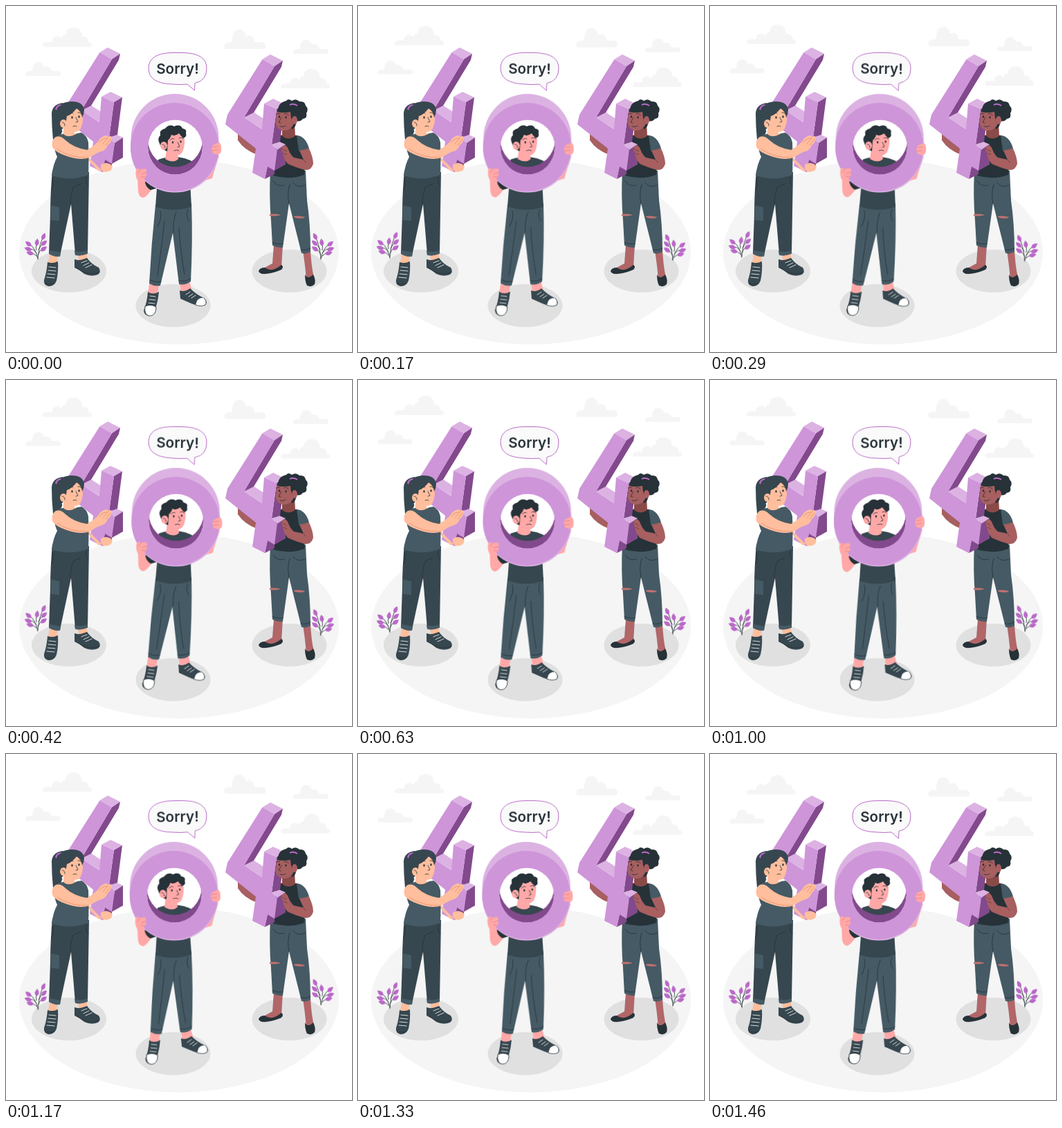
Recreate the animation shown at these times as an HTML page. Size 500x500 px, loop 1500 ms.

```html
<!DOCTYPE html>
<html lang="en">
<head>
<meta charset="utf-8">
<title>Sorry</title>
<style>
html, body { margin: 0; width: 100%; height: 100%; overflow: hidden; background: #fff; }
svg { display: block; width: 100vw; height: 100vh; }
.sway { animation: sway 1.5s linear infinite; }
.float { animation: float 1.5s linear infinite; }
#plants { transform-origin: 250.5px 349px; }
#bubble { transform-origin: 248px 95px; }
#boy { transform-origin: 245px 288px; }
@keyframes sway { 25% { transform: rotate(1deg); } 75% { transform: rotate(-1deg); } }
@keyframes float { 50% { transform: translateY(-10px); } }
.ink { fill: #263238; } .slate { fill: #37474f; } .steel { fill: #455a64; }
.face { fill: #ce95d9; } .lit { fill: #dcb2e3; } .dark { fill: #82498c; } .purple { fill: #ba68c8; }
.pink { fill: #ffa8a7; } .peach { fill: #ffbe9d; } .brown { fill: #a75f60; } .deep { fill: #8a4a48; } .rose { fill: #b16668; }
.line { fill: none; stroke: #263238; stroke-width: .8; stroke-linecap: round; stroke-linejoin: round; }
.lace { fill: none; stroke: #fff; stroke-width: .8; stroke-linecap: round; }
.cloud { fill: #f5f5f5; }
text { font: 600 20.6px Inter, Roboto, sans-serif; fill: #263238; }
</style>
</head>
<body>
<svg viewBox="0 0 500 500">
<defs>
  <path id="big" d="M2 0Q-1-2 1-5Q2-7 8-7H14Q13-15 21-15Q25-15 27-12Q29-18 33-17Q34-28 44-28Q56-28 57-15Q67-15 66-7Q71-7 71-3Q71 0 68 0Z"/>
  <path id="small" d="M2 0Q-1-2 1-5Q2-7 8-7H10Q10-20 19-20Q25-20 27-13Q35-16 38-7H46Q51-7 51-3Q51 0 48 0Z"/>
  <path id="leaf" class="purple" d="M0 0Q-6-4 0-11Q6-4 0 0Z"/>
  <g id="plant">
    <path class="line" d="M46 366Q47 349 53 335M46 360Q48 354 52 351M47 352Q49 348 53 344M46 365Q42 349 35 345M44 357Q40 351 35 351M45 362Q41 358 36 357M44 353Q43 348 44 344"/>
    <use href="#leaf" transform="translate(52 338) rotate(25)"/>
    <use href="#leaf" transform="translate(51 346) rotate(48)"/>
    <use href="#leaf" transform="translate(50 354) rotate(55)"/>
    <use href="#leaf" transform="translate(44 347) rotate(8)"/>
    <use href="#leaf" transform="translate(36.5 347) rotate(-50)"/>
    <use href="#leaf" transform="translate(37 353) rotate(-70)"/>
    <use href="#leaf" transform="translate(40 358.5) rotate(-75)"/>
  </g>
  <g id="four">
    <path class="lit" d="M370.500 77L382 70L400 79L388 87ZM344 161L357 153L374 164L372 179ZM373 141L386 134L403 142L391 149ZM384 200L395 196L404 200L392 208Z"/>
    <path class="dark" d="M388 87L400 79L398 88L358 154L344 161ZM391 149L403 142L396 196L384 200ZM392 208L404 200V229L388 238V243L374 250L378 231H388Z"/>
    <path class="face" d="M370.500 77L388 87L344 161L370 178L373 141L391 149L384 200L392 208L388 238L378 232L374 250L356 241L361 206L317 171L320 157Z"/>
  </g>
</defs>

<ellipse cx="250" cy="355.5" rx="231" ry="133.5" fill="#f5f5f5"/>
<g fill="#e0e0e0">
  <ellipse cx="91" cy="383" rx="54" ry="31"/>
  <ellipse cx="241.500" cy="433" rx="54" ry="31"/>
  <ellipse cx="409.500" cy="383" rx="54" ry="31"/>
</g>

<g class="cloud float">
  <use href="#big" x="53" y="59"/>
  <use href="#big" x="397" y="119"/>
  <use href="#small" x="28" y="101"/>
  <use href="#small" x="415" y="69"/>
  <use href="#small" transform="translate(315 62) scale(1.18 1.4)"/>
</g>

<g id="plants" class="sway">
  <use href="#plant"/>
  <use href="#plant" transform="translate(501) scale(-1 1)"/>
</g>

<g id="bubble" class="sway">
  <path d="M241 67.500H255Q290 68 290 90Q290 108 273 111.500L272.500 122L262 113Q251 114 241 113Q206 112 206 90Q206 68 241 67.500Z" fill="#fafafa" stroke="#ba68c8"/>
  <text x="248" y="97.500" text-anchor="middle">Sorry!</text>
</g>

<!-- left woman -->
<g>
  <path class="slate" d="M82 140Q67 142 66 155Q66 174 68 193Q80 192 82 177Z"/>
  <use href="#four" x="-235" y="-10"/>
  <path class="peach" d="M137 229L143 227Q151 227 154 232L152 237Q147 241 140 239Q136 235 137 229ZM118 217L138 237L134 239L118 222Z"/>
  <path class="peach" d="M63 358H75L74 372Q67 377 61 371ZM103 354H116L118 367L106 372Z"/>
  <path class="slate" d="M60 370Q67 373 75 369Q76 383 73 397Q69 406 61 405Q54 403 55 396Q59 384 60 370ZM99 366Q106 369 117 364Q123 373 134 378Q138 384 133 388Q123 392 113 387Q106 381 99 378Z"/>
  <path class="lace" d="M62 377L72 378M61 382L72 383M60 387L71 388M59 392L70 393M109 371L117 368M112 375L120 371M115 378L124 374"/>
  <path class="line" d="M56 400Q63 405 71 400M101 378Q118 391 134 385"/>
  <path class="slate" d="M67 238Q64 269 64 302L62 358Q70 363 78 361L94 286L100 359Q109 362 118 357L120 240Z"/>
  <path class="steel" d="M62 353L79 356L78 362Q69 363 62 358ZM99 354Q109 357 118 353V358Q108 362 100 360ZM65 288L77 291V311L65 309Z"/>
  <path class="line" d="M93 287Q93 270 98 261L108 257M67 248Q70 259 66 266M116 247Q114 255 119 260"/>
  <path class="peach" d="M82 172L98 174L99 184L110 187L93 200L72 190L83 184Z"/>
  <path class="steel" d="M75 187Q80 185 83 185Q90 192 103 184L109 183Q117 187 119 197Q120 225 119 244Q93 254 66 245Q68 229 74 218Q66 201 75 187Z"/>
  <path class="peach" d="M83 154Q90 145 108 150Q114 164 108 177Q104 184 94 181Q86 179 83 172Z"/>
  <path class="slate" d="M74 152Q73 140 93 138Q111 137 113 150Q113 156 110 161Q109 152 102 148Q95 157 88 159L86 171Q79 171 76 163Z"/>
  <path class="purple" d="M71 149Q73 142 80 142L79 144Q74 145 73 151Z"/>
  <ellipse class="peach" cx="83" cy="170" rx="5" ry="6"/>
  <path class="line" d="M81 168Q85 168 85 173M91 157Q94 153 97 155M104 154Q107 153 109 156M101 161L104 167L101 168M97 174Q100 172 102 174"/>
  <g class="ink"><ellipse cx="95.500" cy="161" rx="1.200" ry="1.800"/><ellipse cx="105.500" cy="160" rx="1.200" ry="1.800"/></g>
  <circle cx="82" cy="179" r="1.400" fill="#fff"/>
  <path class="peach" d="M72 189Q65 193 67 204Q72 212 88 217Q108 224 121 219Q131 212 138 210Q144 209 147 201Q153 197 153 189Q149 186 146 191Q149 187 145 187Q137 188 132 197Q125 204 117 208Q98 205 86 194Q79 187 72 189Z"/>
  <path class="line" style="stroke:#e58d72" d="M147 191L140 199M151 192L144 201M146 191Q139 191 135 197M74 207Q93 220 118 219"/>
</g>

<!-- boy -->
<g id="boy" class="sway">
  <path class="pink" d="M207 401H221L219 417H205ZM251 398L265 397L269 412L253 415Z"/>
  <path class="slate" d="M205 413Q212 418 221 413Q220 424 217 434Q217 446 208 448Q200 448 199 440Q204 428 205 413ZM251 411Q258 414 266 408Q275 417 286 422Q292 428 288 432Q279 435 268 430L252 423Z"/>
  <path d="M201 434Q209 430 217 435Q217 447 208 448Q199 447 201 434ZM276 426Q280 421 286 422Q291 427 288 432Q282 435 274 432Z" fill="#fff"/>
  <path class="line" d="M201 434Q209 430 217 435Q217 447 208 448Q199 447 201 434M274 432Q282 435 288 432Q291 427 286 422"/>
  <path class="lace" d="M208 419L216 420M207 424L216 425M206 429L215 430M260 417L266 413M264 420L270 416M268 422L274 418"/>
  <path class="steel" d="M216 287Q210 344 207 401Q215 406 223 404L241 328L250 402Q259 404 267 398Q270 339 268 285Z"/>
  <path class="line" d="M242 327Q241 309 246 298M223 296Q226 307 219 319M229 311Q225 347 219 389M263 294Q259 302 264 310M250 320Q252 355 258 388M208 396Q216 400 224 398M250 397Q259 399 267 394"/>
  <path class="pink" d="M289 235L302 215L308 217Q301 237 298 249L288 252ZM190 245L202 243L213 261Q205 274 199 277Q192 277 191 268Z"/>
  <path class="ink" d="M212 229L201 255Q202 262 209 266L222 262V235Z"/>
  <path class="slate" d="M220 222Q238 215 258 220Q273 224 282 238L266 254L268 290Q243 299 216 290L218 263V235Z"/>
  <path class="pink" d="M232 207L248 212L249 221Q242 228 230 221Z"/>
  <path class="pink" d="M231 188Q242 179 257 186Q260 200 255 211Q249 219 239 215Q231 212 230 202Z"/>
  <path class="ink" d="M233 210Q224 207 222 199Q218 191 223 187Q221 179 230 177Q236 170 243 174Q252 170 255 177Q262 178 260 184Q262 189 256 191Q253 188 250 184Q244 189 239 186Q237 192 234 194Z"/>
  <ellipse class="pink" cx="228" cy="202" rx="5" ry="6"/>
  <path class="line" d="M226 200Q230 200 230 205M237 194Q240 190 243 192M250 191Q254 189 256 192M248 197L251 203L248 204M243 209Q247 207 250 209"/>
  <g class="ink"><ellipse cx="241" cy="197" rx="1.200" ry="1.800"/><ellipse cx="252.500" cy="196" rx="1.200" ry="1.800"/></g>
  <path class="dark" d="M205 204A39.500 39.500 0 0 0 284 204V193A39.500 39.500 0 0 1 205 193Z"/>
  <path class="lit" fill-rule="evenodd" d="M180.500 191A63.500 64 0 0 1 307.500 191L308.200 206A64 63.500 0 0 1 180.200 206ZM205 204A39.500 39.500 0 0 0 284 204A39.500 39.500 0 0 0 205 204Z"/>
  <path class="face" fill-rule="evenodd" d="M180 204A63.700 64 0 0 1 307.400 204A63.700 64 0 0 1 180 204ZM205 204A39.500 39.500 0 0 0 284 204A39.500 39.500 0 0 0 205 204Z"/>
  <path class="pink" d="M188 236Q191 233 194 236L201 235Q205 237 202 241Q205 244 201 248L198 253L190 252Q186 244 188 236ZM299 201Q303 199 308 197Q312 200 311 210Q309 216 303 214Q298 214 298 210Q296 206 299 201Z"/>
  <path class="line" style="stroke:#e28180" d="M194 236L191 241M202 241L196 243M201 247L196 247M299 204L306 203M298 209L306 208"/>
</g>

<!-- right woman -->
<g>
  <path class="brown" d="M335 184L366 204L363 215Q344 208 335 194Z"/>
  <path class="rose" d="M387 345H400L398 378L385 384L372 379L385 372ZM429 353H440Q441 374 445 393L434 394Q432 373 429 353Z"/>
  <path class="ink" d="M365 383Q367 378 374 378Q384 386 398 374Q402 377 398 381Q387 386 376 387Q366 388 365 383ZM432 388Q436 396 444 388Q448 396 446 402Q442 407 435 404Q432 398 432 388Z"/>
  <path class="steel" d="M382 240Q380 273 383 310L385 346Q392 350 400 349L409 285L427 357Q434 359 440 355Q440 315 435 281L433 238Z"/>
  <path class="line" d="M409 286Q406 270 410 258M386 253Q392 262 402 259M415 255Q421 264 432 259M385 342Q392 345 400 344M426 352Q433 354 440 350"/>
  <path class="rose" d="M381 301Q389 299 396 302Q388 305 381 303ZM416 304Q424 302 432 306Q424 309 416 305Z"/>
  <path class="line" style="stroke:#d98a84" d="M381 302H395M417 305H431"/>
  <path class="ink" d="M392 188Q405 184 420 187Q431 190 434 207L431 244Q410 252 386 245L388 212Z"/>
  <path class="steel" d="M420 187Q433 188 438 206Q431 210 423 209Z"/>
  <use href="#four"/>
  <path class="deep" d="M399 174L417 170L418 188Q408 195 399 188Z"/>
  <path class="ink" d="M394 151Q392 140 405 137Q408 133 413 137Q419 133 424 138Q432 137 433 144Q438 149 434 155Q436 162 429 163Q425 168 420 166Q419 175 414 178L398 165Z"/>
  <path class="brown" d="M391 153Q399 146 414 151L417 166Q414 179 403 180Q393 180 390 171Z"/>
  <path class="ink" d="M392 153Q392 145 400 141Q416 138 420 151Q421 162 414 168Q411 160 411 153Q401 155 392 153Z"/>
  <path d="M410 143Q415 140 421 144" fill="none" stroke="#ba68c8" stroke-width="2"/>
  <ellipse class="brown" cx="417" cy="165" rx="4" ry="6"/>
  <path class="line" d="M391 156Q394 154 396 156M402 156Q406 154 408 158M398 161L394 168L397 169M396 174Q400 176 404 173"/>
  <g class="ink"><ellipse cx="395" cy="160" rx="1.200" ry="1.700"/><ellipse cx="404.500" cy="161" rx="1.200" ry="1.700"/></g>
  <path class="brown" d="M424 209L438 206Q444 219 444 228Q441 238 432 237Q420 234 407 228Q401 221 400 212Q397 206 400 202Q405 199 408 207Q411 215 416 219L430 222Z"/>
  <path class="line" style="stroke:#70393a" d="M430 222L433 226M400 207L405 210M401 213L406 215"/>
</g>
</svg>
</body>
</html>
```
